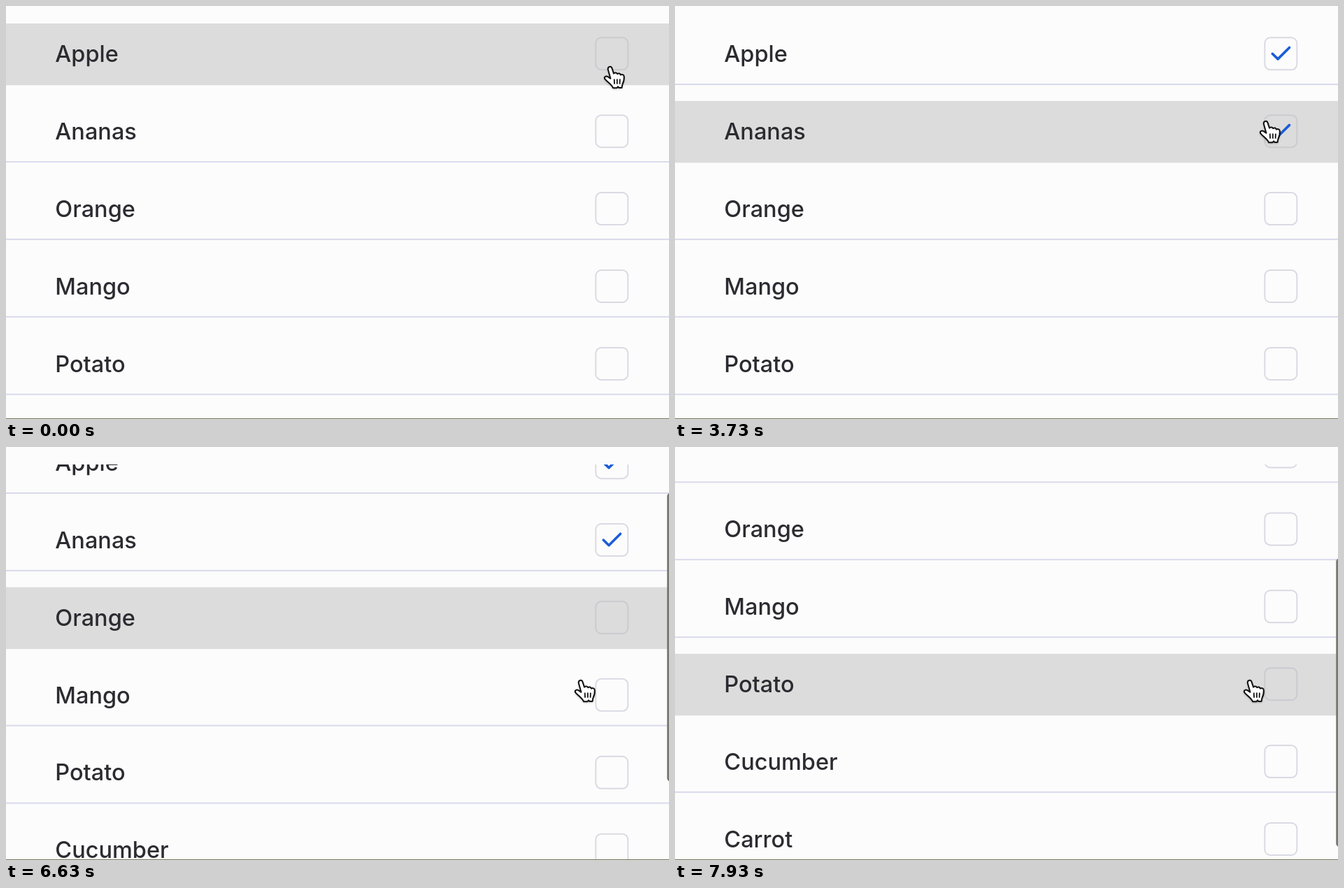
An HTML page with a canvas for the animation above (8000 ms loop, 948 by 591 pixels).

```html
<!DOCTYPE html>
<html lang="en">
<head>
<meta charset="utf-8">
<title>Checklist</title>
<style>
  html, body { margin: 0; width: 100%; height: 100%; overflow: hidden; background: #fcfcfc; }
  canvas { display: block; }
</style>
</head>
<body>
<canvas id="stage" width="948" height="591"></canvas>
<script>
const ctx = document.getElementById('stage').getContext('2d');
const W = 948, H = 591, LOOP = 8000;
const LIST_TOP = 25, PITCH = 110.9, ROW_H = 88.4;
const ITEMS = ['Apple', 'Ananas', 'Orange', 'Mango', 'Potato', 'Cucumber', 'Carrot'];
const CHECK_TIMES = [150, 3560];
const HOVER_REFRESH = 7880;

const clamp01 = v => Math.min(1, Math.max(0, v));
const progress = (t, from, to) => clamp01((t - from) / (to - from));
const smooth = u => u * u * (3 - 2 * u);

function hermite(u, span, y0, y1, v0, v1) {
  const u2 = u * u, u3 = u2 * u;
  return y0 * (2 * u3 - 3 * u2 + 1) + v0 * span * (u3 - 2 * u2 + u)
       + y1 * (3 * u2 - 2 * u3) + v1 * span * (u3 - u2);
}

// A push that picks up speed, then coasts to rest.
function scrollAt(t) {
  if (t < 6310) return 0;
  if (t < 6390) return 4.7 * progress(t, 6310, 6390) ** 2;
  if (t < 6810) return hermite((t - 6390) / 420, 420, 4.7, 88.3, 0.117, 0.249);
  return Math.min(172.7, 178 - 89.7 * Math.exp((6810 - t) / 359.8));
}

function cursorAt(t) {
  const a = smooth(progress(t, 1630, 3170));
  const b = smooth(progress(t, 4500, 5700));
  return { x: 863.7 - 19 * a - 23 * b, y: 87.6 + 78 * a + 169 * b };
}

// Hovering is not re-evaluated until the scroll has come to rest.
function hoveredRow(t, cursor) {
  const offset = t < HOVER_REFRESH ? 0 : scrollAt(t);
  return ITEMS.findIndex((_, i) => {
    const y = cursor.y - (LIST_TOP + i * PITCH - offset);
    return y >= 0 && y <= ROW_H;
  });
}

function drawCheck(y) {
  ctx.beginPath();
  ctx.moveTo(854.2, y);
  ctx.lineTo(862, y + 7.6);
  ctx.lineTo(878.5, y - 8.8);
  ctx.strokeStyle = '#1b5cd8';
  ctx.lineWidth = 3.6;
  ctx.lineCap = 'round';
  ctx.lineJoin = 'round';
  ctx.stroke();
}

function drawRow(i, y, hovered, checked) {
  if (hovered) {
    ctx.fillStyle = '#dcdcdc';
    ctx.fillRect(0, y, W, ROW_H);
  } else {
    ctx.fillStyle = '#d9daec';
    ctx.fillRect(0, y + ROW_H - 2.3, W, 2);
  }
  ctx.fillStyle = '#2b2b31';
  ctx.fillText(ITEMS[i], 70.3, y + 55);

  const mid = y + 43.3;
  ctx.beginPath();
  ctx.roundRect(843.3, mid - 23, 46, 46, 8);
  ctx.strokeStyle = hovered ? '#cbcbd0' : '#dadae4';
  ctx.lineWidth = 2;
  ctx.stroke();
  if (checked) drawCheck(mid);
}

function drawScrollbar(offset, alpha) {
  ctx.globalAlpha = alpha;
  ctx.fillStyle = '#797972';
  ctx.beginPath();
  ctx.roundRect(945.2, 31.5 + 0.74 * offset, 12, 413, 5);
  ctx.fill();
  ctx.globalAlpha = 1;
}

const hand = new Path2D(
  'M-3 3 C-3.4 -1.3 1.7 -2 2.8 1.5 L5.3 9 C7 7.2 9.6 7.6 10.4 9.6 ' +
  'C12.2 8.2 14.5 8.8 15.2 11 C17.5 9.8 19.9 11 20.1 13.4 ' +
  'C20.5 18 19.3 21.5 17.6 25 L16.8 29.5 L12.7 29.5 L11.4 27.8 L9.8 29.6 L4.2 29.6 ' +
  'C3.1 25.6 -2.8 22 -7 17.3 C-9.5 14.2 -6.2 11.7 -3.2 13.6 L0.7 16.2 Z');
const creases = new Path2D('M6 17 L6.3 24.2 M10.1 17 L10.1 24.2 M14.1 17 L13.9 24.2');

function drawCursor({ x, y }) {
  ctx.save();
  ctx.translate(x, y);
  ctx.shadowColor = 'rgba(0,0,0,.35)';
  ctx.shadowBlur = 3;
  ctx.shadowOffsetY = 1.5;
  ctx.fillStyle = '#fff';
  ctx.fill(hand);
  ctx.shadowColor = 'transparent';
  ctx.strokeStyle = '#111';
  ctx.lineJoin = 'round';
  ctx.lineCap = 'butt';
  ctx.lineWidth = 2;
  ctx.stroke(hand);
  ctx.lineWidth = 1.8;
  ctx.stroke(creases);
  ctx.restore();
}

function draw(t) {
  const offset = scrollAt(t), cursor = cursorAt(t), hovered = hoveredRow(t, cursor);
  ctx.fillStyle = '#fcfcfc';
  ctx.fillRect(0, 0, W, H);

  ctx.save();
  ctx.beginPath();
  ctx.rect(0, 25, W, H - 25);
  ctx.clip();
  ctx.font = '500 32.5px Inter, sans-serif';
  ctx.textBaseline = 'alphabetic';
  ITEMS.forEach((_, i) =>
    drawRow(i, LIST_TOP + i * PITCH - offset, i === hovered, t >= CHECK_TIMES[i]));
  ctx.restore();

  drawScrollbar(offset, progress(t, 6300, 6370));
  ctx.fillStyle = '#74745c';
  ctx.fillRect(0, H - 1, W, 1);
  drawCursor(cursor);
}

const start = performance.now();
function tick() {
  draw((performance.now() - start) % LOOP);
  requestAnimationFrame(tick);
}
tick();
</script>
</body>
</html>
```
